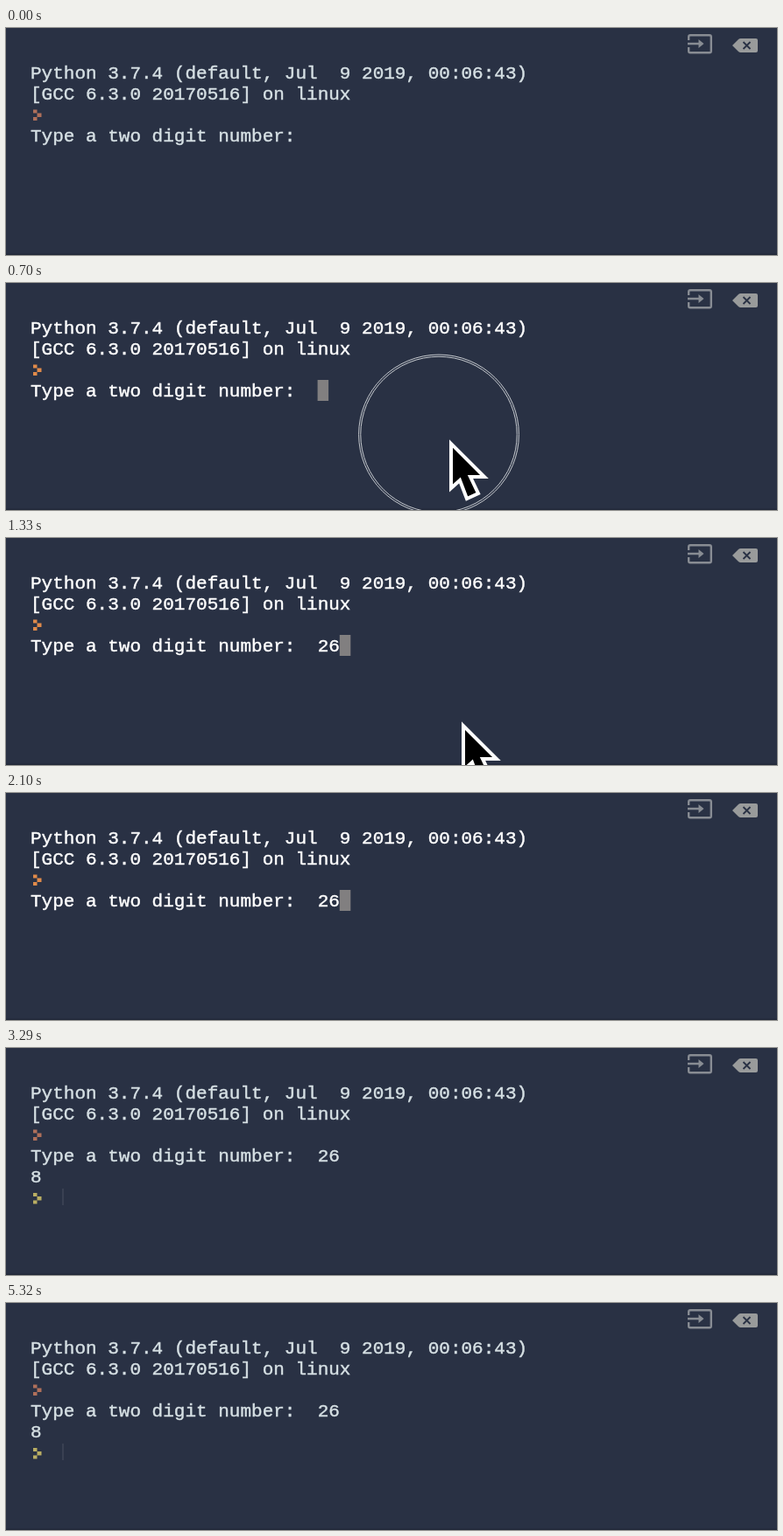
These frames come from a looping animation (880 px wide and 260 px high, 5390 ms). An HTML page:

```html
<!DOCTYPE html>
<html lang="en">
<head>
<meta charset="utf-8">
<title>Terminal</title>
<style>
  html, body { margin: 0; width: 100%; height: 100%; overflow: hidden; background: #293144; }
  svg { display: block; width: 880px; height: 260px; }
  text {
    font: 21px "Liberation Mono", monospace;
    white-space: pre;
    stroke-width: .45px;
  }
  #screen { fill: #d6e0e4; stroke: #d6e0e4; }
  #screen.bright { fill: #fff; stroke: #fff; }
  .prompt { stroke: none; fill: #b0705a; }
  .bright .prompt { fill: #e08a4a; }
  #nextPrompt { stroke: none; fill: #b9ae62; }
</style>
</head>
<body>
<svg viewBox="0 0 880 260">
  <defs><path id="chevron" d="M31 0h4.5v4h5v4.5h-5v4H31v-4h4.5v-4.5H31z"/></defs>
  <rect width="880" height="260" fill="#293144"/>
  <rect y="258.5" width="880" height="1.5" fill="#222939"/>

  <g fill="none" stroke="#888c93" stroke-width="2.4">
    <path d="M779.2 14V10q0-1.8 1.8-1.8h22q1.8 0 1.8 1.8v16.500q0 1.800-1.800 1.800h-22q-1.800 0-1.800-1.800V22M778 18h16"/>
    <path d="M790.500 13l6 5-6 5z" fill="#888c93" stroke="none"/>
  </g>
  <path d="M829 20l7-7q1-1 2.500-1H856q2 0 2 2v12q0 2-2 2h-17.500q-1.500 0-2.500-1z" fill="#999b9b"/>
  <path d="M841.500 16l8 8m0-8l-8 8" stroke="#293144" stroke-width="1.800"/>

  <g id="screen">
    <text x="28" y="58">Python 3.7.4 (default, Jul  9 2019, 00:06:43)</text>
    <text x="28" y="82">[GCC 6.3.0 20170516] on linux</text>
    <use class="prompt" href="#chevron" y="93.500"/>
    <text id="question" x="28" y="130"></text>
    <g id="result">
      <text x="28" y="154">8</text>
      <use id="nextPrompt" href="#chevron" y="166"/>
      <path id="trace" d="M65 161v19" stroke="#4b5160" stroke-width="1"/>
    </g>
  </g>
  <rect id="caret" width="12.500" height="24" fill="#817f80"/>

  <g id="ring" fill="none" stroke="#d5d8dc" stroke-width=".9">
    <circle id="outer" cx="494" cy="173.500"/>
    <circle id="inner" cx="494" cy="173.500"/>
  </g>
  <path id="pointer" d="M2 6V57L12 48 20 69 33 63 24 44H40z" stroke="#fff" stroke-width="4" stroke-miterlimit="8"/>
</svg>
<script>
const LOOP = 5390, STEP = 70;
const CELL = 12.6, LEFT = 28;
const CLICK = 560, ENTER = 2170;

// [time, x, y] of the pointer tip
const path = [
  [420, 478, 235], [560, 494, 173], [700, 506, 178], [910, 507, 179],
  [1190, 507, 179], [1260, 512, 190], [1330, 520, 209], [1470, 546, 264]
];

const $ = id => document.getElementById(id);
const show = (id, on) => $(id).style.display = on ? "" : "none";

function pointerAt(t) {
  const i = path.findIndex(key => key[0] > t);
  const [t0, x0, y0] = path[i - 1], [t1, x1, y1] = path[i];
  const k = (t - t0) / (t1 - t0);
  return [x0 + (x1 - x0) * k, y0 + (y1 - y0) * k];
}

function drawPointer(t) {
  const visible = t >= 420 && t < 1470;
  show("pointer", visible);
  if (visible) $("pointer").setAttribute("transform", `translate(${pointerAt(t)})`);

  const age = t - CLICK;
  show("ring", age > 0 && age <= 280);
  const radius = Math.max(0, age * 0.653);
  $("outer").setAttribute("r", radius);
  $("inner").setAttribute("r", Math.max(0, radius - 2.2));
  $("ring").setAttribute("opacity", Math.min(1, Math.max(0, (350 - age) / 210)));
}

function drawTerminal(t) {
  const typed = t < 980 ? "" : t < 1120 ? "2" : "26";
  const done = t >= ENTER + STEP;
  $("question").textContent = "Type a two digit number:  " + typed;
  $("screen").classList.toggle("bright", t >= 420 && t < 2380);
  show("result", done);
  show("trace", t >= 2450);
  show("caret", t > CLICK && t < 2450);
  $("caret").setAttribute("x", LEFT + CELL * (done ? 2 : 26 + typed.length));
  $("caret").setAttribute("y", done ? 159 : 111);
}

function frame() {
  const t = Math.floor(performance.now() % LOOP / STEP) * STEP;
  drawTerminal(t);
  drawPointer(t);
  requestAnimationFrame(frame);
}
frame();
</script>
</body>
</html>
```
